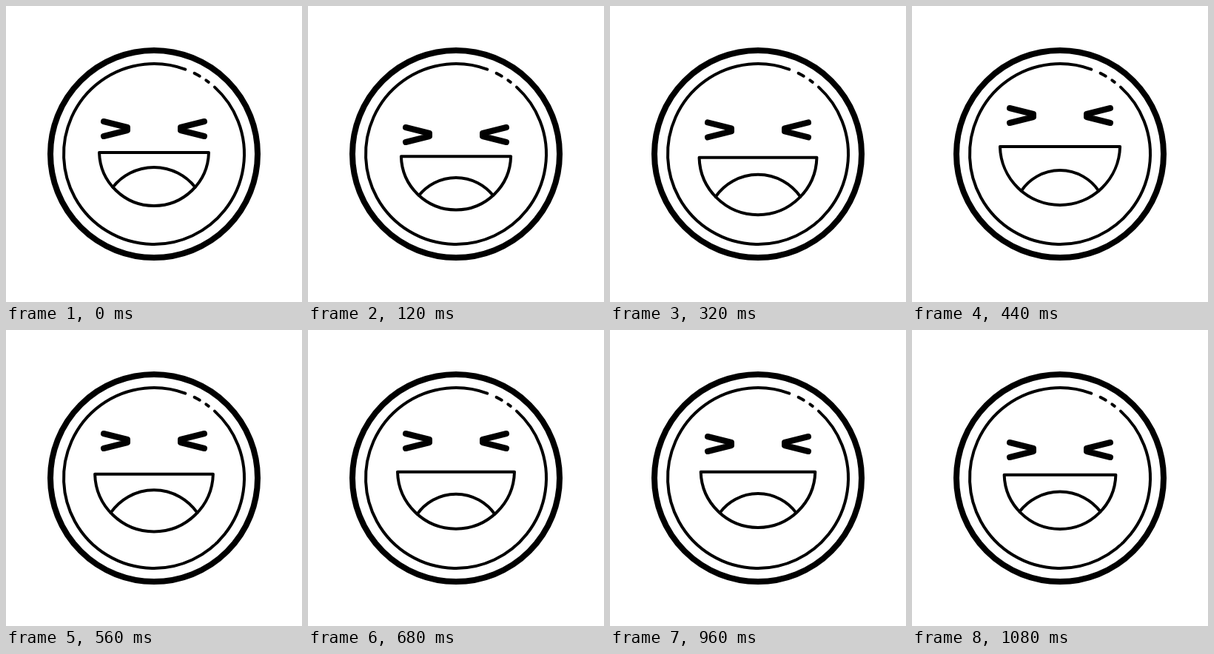
These frames come from a looping animation (400x400 px, 1.12 s). An HTML page:

```html
<!DOCTYPE html>
<html lang="en">
<head>
<meta charset="utf-8">
<title>Laughing face</title>
<style>
  html, body { margin: 0; width: 100%; height: 100%; overflow: hidden; background: #fff; }
  svg { display: block; width: 100%; height: 100%; }
  path, circle { fill: none; stroke: #000; stroke-width: 4; stroke-linecap: round; stroke-linejoin: round; }
  .bold { stroke-width: 8; }
</style>
</head>
<body>
<svg viewBox="0 0 400 400">
  <circle class="bold" cx="200" cy="200" r="140"/>
  <path id="rim"/>
  <g id="eyes">
    <path class="bold" d="M132 -10L164 -2V2L132 10"/>
    <path class="bold" d="M268 -10L236 -2V2L268 10"/>
  </g>
  <path id="mouth"/>
  <path id="tongue"/>
</svg>
<script>
const LOOP = 1120, STEP = 40, BEAT = 280, RISE = 160;
const $ = id => document.getElementById(id);

// Tracks are [time, value] pairs that wrap around the loop.
const eyeY = track([[0, 156], [240, 168], [440, 138], [620, 140.7], [800, 138], [960, 144], [1080, 152]]);
const chinY = track([[0, 270], [240, 287.8], [440, 273], [600, 272.3], [800, 271.8], [960, 270.3]]);
const mouthSize = track([[0, 1], [240, 1.007], [370, 1.106], [440, 1.096], [680, 1.068], [800, 1.064], [960, 1.045], [1080, 1.019]]);

// Smooth cyclic interpolation without overshoot.
function track(keys) {
  const n = keys.length;
  const at = i => {
    const k = keys[(i + n) % n];
    return [k[0] + LOOP * Math.floor(i / n), k[1]];
  };
  const rate = i => {
    const [t0, v0] = at(i), [t1, v1] = at(i + 1);
    return (v1 - v0) / (t1 - t0);
  };
  const slope = i => {
    const a = rate(i - 1), b = rate(i);
    return a * b > 0 ? 2 * a * b / (a + b) : 0;
  };
  return t => {
    let i = n - 1;
    while (keys[i][0] > t) i--;
    const [t0, v0] = at(i), [t1, v1] = at(i + 1);
    const d = t1 - t0, u = (t - t0) / d, w = 1 - u;
    return v0 * (1 + 2 * u) * w * w + v1 * u * u * (3 - 2 * u)
      + d * u * w * (slope(i) * w - slope(i + 1) * u);
  };
}

const ease = u => (1 - Math.cos(Math.PI * u)) / 2;

function laugh(t) {
  const b = t % BEAT;
  return b < RISE ? ease(b / RISE) : 1 - ease((b - RISE) / (BEAT - RISE));
}

// Arc on the inner rim, in degrees clockwise from the top.
function rimArc(from, to) {
  const point = deg => {
    const a = deg * Math.PI / 180;
    return `${200 + 122 * Math.sin(a)} ${200 - 122 * Math.cos(a)}`;
  };
  return `M${point(from)}A122 122 0 ${to - from > 180 ? 1 : 0} 1 ${point(to)}`;
}

function draw(t) {
  const beat = laugh(t), size = mouthSize(t);
  $('eyes').setAttribute('transform', `translate(0 ${eyeY(t) + 10})`);

  const R = 74 * size;
  const centre = chinY(t) - 4 * beat - R;
  const lip = centre + 2 * size;
  const half = Math.sqrt(R * R - 4 * size * size);
  $('mouth').setAttribute('d',
    `M${200 - half} ${lip}H${200 + half}A${R} ${R} 0 0 1 ${200 - half} ${lip}Z`);

  // The tongue ends where its circle meets the mouth's circle.
  const r = 71 - 8 * beat;
  const top = lip + 20 * size + 10 * beat;
  const gap = top + r - centre;
  const drop = (gap * gap + R * R - r * r) / (2 * gap);
  const reach = Math.sqrt(R * R - drop * drop);
  const y = centre + drop;
  $('tongue').setAttribute('d',
    `M${200 - reach} ${y}A${r} ${r} 0 0 1 ${200 + reach} ${y}`);
}

function tick() {
  draw(Math.floor(performance.now() % LOOP / STEP) * STEP);
  requestAnimationFrame(tick);
}

$('rim').setAttribute('d',
  rimArc(42.2, 380.3) + rimArc(26.6, 30.4) + rimArc(35.2, 37.2));
tick();
</script>
</body>
</html>
```
